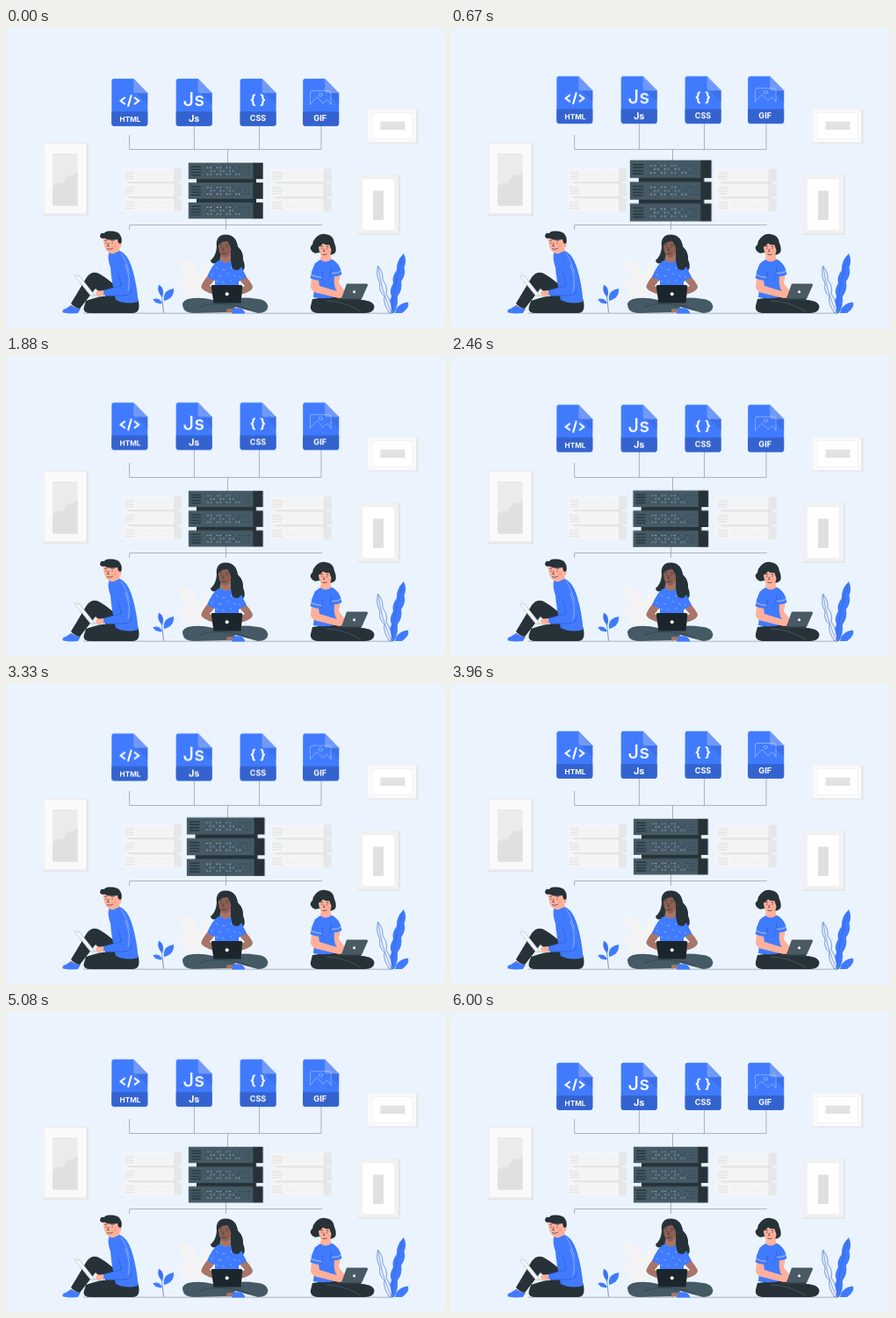
These frames come from a looping animation (500 px wide and 342 px high, 6040 ms). An HTML page:

```html
<!DOCTYPE html>
<html lang="en">
<head>
<meta charset="utf-8">
<title>Server room</title>
<style>
html, body { margin: 0; width: 100%; height: 100%; overflow: hidden; background: #ebf4fe; }
svg { display: block; width: 500px; height: 342px; }
text { font-family: Inter, "Open Sans", sans-serif; font-weight: 700; fill: #fff; text-anchor: middle; }
.files { animation: float 6.04s linear infinite; }
.rack { animation: beat 6.04s linear infinite; transform-origin: 250.4px 185.5px; }

/* 3 s bob, held for the last 40 ms of the loop */
@keyframes float {
  0%, 49.67%, 99.34%, 100% { transform: translateY(0); }
  24.83%, 74.5% { transform: translateY(-6.3px); }
}
/* 6 s double beat */
@keyframes beat {
  0%, 29.8%, 39.74%, 59.6%, 100% { transform: scale(1); }
  9.93%, 49.67% { transform: scale(1.1); }
}

.wire, .ink { fill: none; stroke: #7d8790; stroke-width: .6; }
.ink { stroke: #263238; stroke-width: .7; stroke-linecap: round; }
.slots { stroke: #263238; stroke-width: 1.2; }
.blue { fill: #407bff; }
.dark { fill: #263238; }
.slate { fill: #455a64; }
.skin { fill: #ffb09a; }
.brown { fill: #a87568; }
.face { fill: #8f5f54; }
.pale { fill: #f4f4f5; }
.crease { stroke: #2d5bc8; }
.white { fill: none; stroke: #fff; stroke-width: .7; stroke-linecap: round; }
.dots { fill: none; stroke-width: 1.25; stroke-linecap: round; }
</style>
</head>
<body>
<svg viewBox="0 0 500 342">
  <defs>
    <g id="file">
      <path class="blue" d="M3 0H25L41 16.5V51a3 3 0 0 1-3 3H3a3 3 0 0 1-3-3V3a3 3 0 0 1 3-3Z"/>
      <path fill="#3468d6" d="M28 16.5H41V29.5Z" opacity=".55"/>
      <path fill="#7299f8" d="M25 0L41 16.5H28a3 3 0 0 1-3-3Z"/>
      <path fill="#3463cf" d="M0 37.5H41V51a3 3 0 0 1-3 3H3a3 3 0 0 1-3-3Z"/>
    </g>
    <g id="unit">
      <rect class="slate" width="74" height="18.6"/>
      <rect class="dark" x="73.5" width="11.4" height="18.6"/>
      <path class="slots" d="M3 4.6H14M3 7.8H14M3 11H14M3 14.2H14"/>
      <g class="dots">
        <path stroke="#2b3a42" stroke-dasharray="0 3.6" d="M22 5.6H72M22 9.4H72M22 13.2H72"/>
        <path stroke="#e4eaf2" stroke-dasharray="0 3.6 0 7.2" d="M22 5.6H54M25.6 9.4H54M22 13.2H60"/>
        <path stroke="#407bff" stroke-dasharray="0 10.8" d="M43.6 5.6H60M29.2 9.4H66M47.2 13.2H56"/>
      </g>
    </g>
    <g id="paleUnit">
      <rect fill="#f5f5f6" width="58" height="14.6"/>
      <rect fill="#e6e7e8" x="58" width="9" height="14.6"/>
      <path stroke="#dfe0e2" d="M2 4H13M2 6.5H13M2 9H13M2 11.5H13"/>
      <path class="dots" stroke="#e6e7e9" stroke-dasharray="0 3" d="M18 4.6H56M18 7.4H56M18 10.2H56"/>
    </g>
    <g id="paleRack">
      <path fill="#e3e4e6" d="M6 13H62V36H6Z"/>
      <use href="#paleUnit"/>
      <use href="#paleUnit" y="17"/>
      <use href="#paleUnit" y="34"/>
    </g>
  </defs>

  <!-- wall pictures -->
  <g>
    <path fill="#e4e5e6" d="M42 130.5H94V214H42Z"/>
    <path fill="#f0f0f1" d="M42 130.5H92V212.5H42Z"/>
    <path fill="#fafafa" d="M44 132.5H91V211H44Z"/>
    <path fill="#ebebec" d="M53 143H81.5V202.5H53Z"/>
    <path fill="#e0e0e1" d="M53 202.5V182Q57 175 61 177Q66 177 68 171Q71 166 76 168Q80 167 81.5 163V202.5Z"/>

    <path fill="#e2e3e5" d="M411.5 93H469.5V131.5H411.5Z"/>
    <path fill="#fafafa" stroke="#ececee" stroke-width=".7" d="M411.5 92.5H467.5V130.5H411.5Z"/>
    <path fill="#fff" stroke="#eee" stroke-width=".6" d="M417 96.5H463V126.5H417Z"/>
    <path fill="#e2e2e3" d="M426.5 106.5H454.5V116H426.5Z"/>

    <path fill="#e4e5e6" d="M401 167.5H449V235.5H401Z"/>
    <path fill="#f1f1f2" d="M400.5 167.5H447V234H400.5Z"/>
    <path fill="#fff" d="M406 172.5H442V230H406Z"/>
    <path fill="#e0e0e1" d="M418 185.5H430V219H418Z"/>
  </g>

  <path class="wire" d="M140.6 122V138.4H359V106M214.4 106V138.4M288.5 106V138.4M252.5 138.4V156M250.4 214V230M140.6 230V224.6H360"/>

  <use href="#paleRack" x="133" y="160.3"/>
  <g transform="translate(301.5 160.5) scale(1.035 1)"><use href="#paleRack"/></g>

  <g class="rack">
    <path class="dark" d="M217 170H285V202H217Z"/>
    <use href="#unit" x="207.8" y="153.6"/>
    <use href="#unit" x="207.8" y="176.2"/>
    <use href="#unit" x="207.8" y="198.8"/>
  </g>

  <g class="files">
    <use href="#file" x="120.3" y="57.8"/>
    <use href="#file" x="193.7" y="57.8"/>
    <use href="#file" x="266.6" y="57.8"/>
    <use href="#file" x="338.2" y="57.8"/>
    <text x="141.5" y="107" font-size="8.2">HTML</text>
    <text x="214.2" y="107.2" font-size="11">Js</text>
    <text x="287" y="106" font-size="9">CSS</text>
    <text x="357.8" y="106" font-size="9.2">GIF</text>
    <path class="white" style="stroke-width:2.1;stroke-linecap:butt" d="M135.8 79L130.6 83L135.8 87M146 79L151.2 83L146 87M142.8 76.3L139 89.6"/>
    <text x="213.8" y="89" font-size="22" style="font-weight:500">Js</text>
    <text x="281.2" y="86.6" font-size="15">{</text>
    <text x="292.4" y="86.6" font-size="15">}</text>
    <g class="white" style="stroke-width:.5" stroke-opacity=".7">
      <path d="M349 71.5H367.5Q370 71.5 370 74V87M349 71.5Q346.5 71.5 346.5 74V87"/>
      <path d="M346.5 87L353 79.5Q354.5 78.5 356 80.5L361 86L364.5 82.5Q366 81.5 367 83L370 87"/>
      <circle cx="358.2" cy="76" r="2"/>
    </g>
  </g>

  <path class="wire" d="M88 325.2H441"/>

  <!-- plants -->
  <g class="pale">
    <path d="M221 304Q201 289 197 263Q213 262 219 279Q222 290 224 302Z"/>
    <path d="M222 305Q199 301 195 287Q211 281 222 302Z"/>
    <path d="M224 306Q207 310 199 302Q210 295 224 303Z"/>
    <path d="M222 301Q218 278 228 265Q236 283 226 302Z"/>
  </g>
  <g class="blue">
    <path d="M178 307Q171 300 174 292.5Q182 297 178 307Z"/>
    <path d="M180 311Q178 299 191 297Q192 308 180 311Z"/>
    <path d="M178 314Q169 315 167.5 309Q175 307 178 314Z"/>
    <path class="wire" style="stroke:#34549d" d="M175.5 296Q178.5 310 179.5 324.5"/>
    <path d="M436 325Q435 315 439 306Q436 299 441 291Q439 284 445 276Q444 266 453 257Q457 265 453.5 273Q456 281 450 289Q452 298 446 306Q447 317 442 325Z"/>
    <path d="M443 325Q445 314 458 312.5Q460 319 451 325Z"/>
  </g>
  <path fill="#e6effe" stroke="#4a74d8" stroke-width=".7" d="M437 325Q429 314 431 306Q424 300 426 291Q421 283 423.5 271Q430 279 429 287Q435 294 433 303Q439 311 440 325Z"/>
  <path class="ink crease" style="stroke-width:.5" d="M424 273Q428 302 439 324M452 260Q442 292 439 324"/>

  <!-- left person -->
  <g>
    <path class="dark" d="M91 311Q106 305 130 304L150 308Q155 325 144 325H96Q88 325 88.5 319Z"/>
    <path class="skin" d="M77 312L85 317L81 321L73 318Z"/>
    <path class="blue" d="M74 316Q79 320 85 320L82 325Q74 326 65 324.5Q63 321 68 320Z"/>
    <path class="dark" d="M137 306Q119 287 106 280Q98 276 92 284L74 314Q78 319 84 320L102 297L119 314Q129 322 143 320Z"/>

    <path class="skin" d="M117 247H129L130 260Q122 264 118 257Z"/>
    <path class="blue" d="M117.5 255.5Q122 258 129.5 254Q138 257 143 272Q149 291 150.5 312Q137 316 125 310Q120 288 119 273Q115 262 117.5 255.5Z"/>
    <path class="white" opacity=".5" d="M131 257Q138 266 141 282"/>
    <path class="skin" d="M111 243Q110 235 119 235Q130 235 130.5 245Q130 256 121 257.5Q112 256 111 243Z"/>
    <path class="dark" d="M107 238Q107 233 112 234Q113 231 119 231.5Q128 231.5 130 236Q133 241 131 246L129 247Q127.5 244 127 241Q118 243 112 239.5Q109 241 107 238Z"/>
    <circle class="skin" cx="129.3" cy="247.8" r="2.3"/>
    <path class="ink" d="M114 244.8V245.6M121 244.6V245.4M112.6 242.3L115 242M119.8 242L122.6 242.2M117 245.4L115.8 248.6H117.4M115.5 251.8Q118.5 253.6 121.5 251.2"/>
    <circle fill="#ff8f79" cx="124" cy="248.6" r="1.8" opacity=".5"/>

    <path class="blue" d="M122 265Q131 261 137 272Q145 287 143 298Q142 304.5 135 305L110 305.5L109 299.5L130 294L123 279Z"/>
    <path class="ink crease" d="M127 279L131.5 293.5L112 299M143 298Q142 304.5 135 305L114 305.4"/>
    <path class="white" opacity=".55" d="M136 270Q143 287 139 300"/>
    <path fill="#f3f5f8" stroke="#a4abb2" stroke-width=".5" d="M78 282.5Q78.5 281.4 80 281.8L84 283L101 304.5L97 306Z"/>
    <path fill="#cfd4d8" d="M96 304.4H113V306H97Z"/>
    <path class="skin" d="M111 299.3L104 299.5Q101 301.5 103 304.5L107 305.6L111.5 304.6Z"/>
  </g>

  <!-- middle person -->
  <g>
    <path class="dark" d="M240 250Q238 236 250 235.5Q262 235.5 264 249Q271 256 270 264Q275 276 266 279Q256 281 252 271Q246 271 241 268Q234 270 233 265Q239 260 240 250Z"/>
    <path class="brown" d="M245 256H256V268Q251 273 243 266Z"/>
    <path class="slate" d="M236 310Q220 306 207 309Q199 312 201.5 318Q203 325 214 325L258 324L261 318L287 325Q298 325 298.5 317Q297 309 284 308.5Q268 306 256 310Z"/>
    <path class="ink" style="stroke:#2e4049" d="M220 318Q240 311 264 317L277 321"/>
    <path class="blue" d="M256 320.5Q262 318.5 268 320Q273 323 272 325.6H257Z"/>
    <path class="brown" d="M251 320.5L257 320L259 324L251 324.5Z"/>

    <path class="brown" d="M231 281L240 284L232 294L238 298L237 304Q224 300 222.3 295.5Q223 290 231 281Z"/>
    <path class="brown" d="M263 284L271 281Q280 290 281 295.5Q280 301 267 304L265 298L272 294Z"/>
    <path class="blue" d="M244 264Q250 271 257 265Q266 266 270 276L274 284L265 289V305H238V288L229 284Q235 268 244 264Z"/>
    <path class="white" stroke-opacity=".7" d="M240 273L241 274M247 276L248.5 275.3M256 272.5L257 274M243 282L244.5 283M252 280.5L253 279.5M260 282L261 283M240 289L241 288.4M247 289L248 290M256 288L257 287.5M266 283L267 284M234 281L235 282"/>
    <path class="face" d="M242 248Q242 240 250 240Q257 241 257 250Q256 260 249.5 262Q242 259 242 248Z"/>
    <path class="dark" d="M240.5 249Q240 239 249 237.5Q262 238 262 254Q269 262 268 272Q264 279 258 274Q255 264 257 256Q256 248 252 243Q247 243 243.5 246Z"/>
    <path class="ink" d="M245 249.6V250.4M251.3 249.6V250.4M243.8 247.4L246 247M250.4 247L253 247.4M247.8 250.5L247 253.6H248.6M246.6 257Q248.6 258 251 256.6"/>
    <path fill="#1b262c" d="M235.5 293H267.5Q269.5 293 269.3 295L267.5 313.5H236.5L233.8 295Q233.5 293 235.5 293Z"/>
    <circle fill="#fff" cx="251.7" cy="303.2" r="2"/>
  </g>

  <!-- right person -->
  <g>
    <path class="dark" d="M349 309L381 305L405 310Q419 311 419.5 318Q419 325 409 325H357Q346 325 347 317Z"/>
    <path class="ink" style="stroke:#53636c" d="M365 311Q384 311 404 323"/>
    <path class="dark" d="M352 240Q357 234 364 235Q373 236 374 245Q377 252 375 256Q371 260 366 258L356 256Q351 258 348 254Q345 250 349 247Q349 243 352 240Z"/>
    <path class="skin" d="M359 256H369L371 266Q364 271 358 266Z"/>
    <path class="blue" d="M358 264Q364 269 371 263.5Q379 267 382 280L376 284L378 306Q363 310 350 307L352 287L347 284Q349 268 358 264Z"/>
    <path class="skin" d="M356 250Q356 241 364 241Q371 242 371 251Q370 261 364 263Q357 261 356 250Z"/>
    <path class="dark" d="M354.5 250Q354 240 363 239Q372 239 373.5 250L371 254Q369 250 368.5 247Q364 248 361 245.5Q359 249 354.5 250Z"/>
    <path class="ink" d="M360 251V251.8M366 251.2V252M358.8 249L360.8 248.8M365 249L367 249.3M362.6 252L361.6 254.8H363M361 258.2Q363 259.2 365.3 258"/>
    <circle fill="#ff8f79" cx="367.6" cy="255.4" r="1.4" opacity=".5"/>
    <path class="skin" d="M374 283L381 281L379 291L386 300L384 304L376 299Q373 293 374 283Z"/>
    <path class="skin" d="M348 285L356 287L357 294L380 301L387 303L388 307L379 308L354 302Q347 300 347 294Z"/>
    <path class="blue" d="M352 268Q360 268 361 277L359 288Q352 288 346.5 285Z"/>
    <path class="blue" d="M370 265Q380 266 382.5 281Q377 284 370 283Z"/>
    <path class="white" opacity=".8" d="M347.6 281.5Q353 284 360 284.5M371 279.5Q377 280 381.6 277.5"/>
    <path class="ink crease" d="M360.5 278L359.5 287M370.5 274L370 283"/>
    <path fill="#4a5a64" d="M388 291.5H410.5Q412.5 291.6 412 293.5L405 309Q404.5 310 403 310H381.5Z"/>
    <path fill="#303c44" d="M375 308.6H404V310.4H376Z"/>
    <circle fill="#fff" cx="396.6" cy="300.7" r="1.5"/>
  </g>
</svg>
</body>
</html>
```
